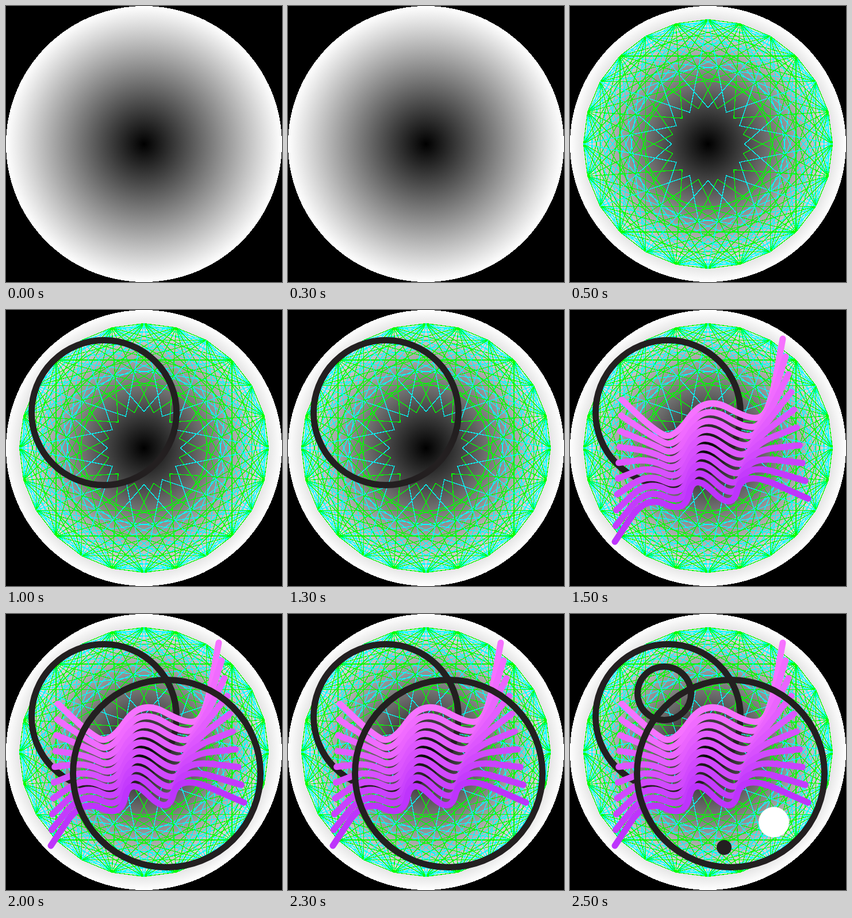
Write an HTML page that moves like this. It is 480 px wide and 480 px high and loops after 3 s.

```html
<!DOCTYPE html>
<html>
<head>
<meta charset="utf-8">
<style>
  html, body { margin: 0; width: 100%; height: 100%; overflow: hidden; background: #000; }
  svg { display: block; width: 100vw; height: 100vh; }
  .ring { stroke: #231f20; stroke-width: 11; }
</style>
</head>
<body>
<svg viewBox="0 0 480 480" fill="none">
  <defs>
    <radialGradient id="glow">
      <stop offset="0" stop-color="#000"/>
      <stop offset="1" stop-color="#fff"/>
    </radialGradient>
  </defs>
  <circle cx="240" cy="240" r="240" fill="url(#glow)" shape-rendering="crispEdges"/>
  <g class="layer" id="web" stroke-width="1.3" shape-rendering="crispEdges"/>
  <g class="layer"><circle class="ring" cx="170.5" cy="178.5" r="126"/></g>
  <g class="layer" id="waves" stroke-width="11" stroke-linecap="round"/>
  <g class="layer"><circle class="ring" cx="279.5" cy="277.5" r="163"/></g>
  <g class="layer">
    <circle class="ring" cx="164" cy="138" r="46.5"/>
    <circle cx="268" cy="406" r="13" fill="#231f20"/>
    <circle cx="354.5" cy="362" r="26.5" fill="#fff"/>
  </g>
</svg>
<script>
const CYAN = '#0ff', GREEN = '#0f0';
const RADIUS = 216.5, NOTCH = RADIUS * (1 - Math.SQRT1_2);
const WAVES = 10, STEP_MS = 500;

function addPath(parent, d, stroke) {
  const path = document.createElementNS('http://www.w3.org/2000/svg', 'path');
  path.setAttribute('d', d);
  path.setAttribute('stroke', stroke);
  parent.append(path);
}

// Position number i of 24 around the centre, clockwise from the top
function spoke(i, r = RADIUS) {
  const a = i * Math.PI / 12;
  return [240 + r * Math.sin(a), 240 - r * Math.cos(a)];
}

const web = document.getElementById('web');
function addChords(step, color) {
  let d = '';
  for (let i = 0; i < 24; i++) d += `M${spoke(i)}L${spoke(i + step)}`;
  addPath(web, d, color);
}
for (const step of [2, 3, 5, 7]) addChords(step, CYAN);
for (const step of [1, 4, 6, 8]) addChords(step, GREEN);

// Six-pointed stars, each turned by one position
for (let turn = 0; turn < 4; turn++) {
  const points = [];
  for (let i = 0; i < 12; i++) points.push(spoke(turn + 2 * i, i % 2 ? NOTCH : RADIUS));
  addPath(web, `M${points.join('L')}Z`, turn % 2 ? GREEN : CYAN);
}

const mix = (from, to, t) => from.map((v, i) => v + (to[i] - v) * t);

// Zigzag with straight ends and rounded corners
function smoothPath(points) {
  let d = `M${points[0]}`;
  for (let i = 1; i < points.length; i++) {
    const middle = mix(points[i - 1], points[i], 0.5);
    d += i === 1 ? `L${middle}` : `Q${points[i - 1]} ${middle}`;
  }
  return d + `L${points.at(-1)}`;
}

// Blend from the top wave to the bottom wave
const topWave = [[90, 156], [145, 208], [180, 226], [235, 148], [318, 194], [347, 176], [370, 50]];
const bottomWave = [[78, 403], [132, 322], [200, 354], [215, 282], [282, 350], [300, 278], [414, 328]];
const waves = document.getElementById('waves');
for (let i = 0; i < WAVES; i++) {
  const t = i / (WAVES - 1);
  const points = topWave.map((p, k) => mix(p, bottomWave[k], t));
  addPath(waves, smoothPath(points), `rgb(${mix([246, 114, 255], [190, 52, 252], t)})`);
}

const layers = document.querySelectorAll('.layer');
function render(now) {
  const shown = Math.floor(now / STEP_MS) % (layers.length + 1);
  layers.forEach((layer, i) => { layer.style.display = i < shown ? '' : 'none'; });
  requestAnimationFrame(render);
}
render(performance.now());
</script>
</body>
</html>
```
